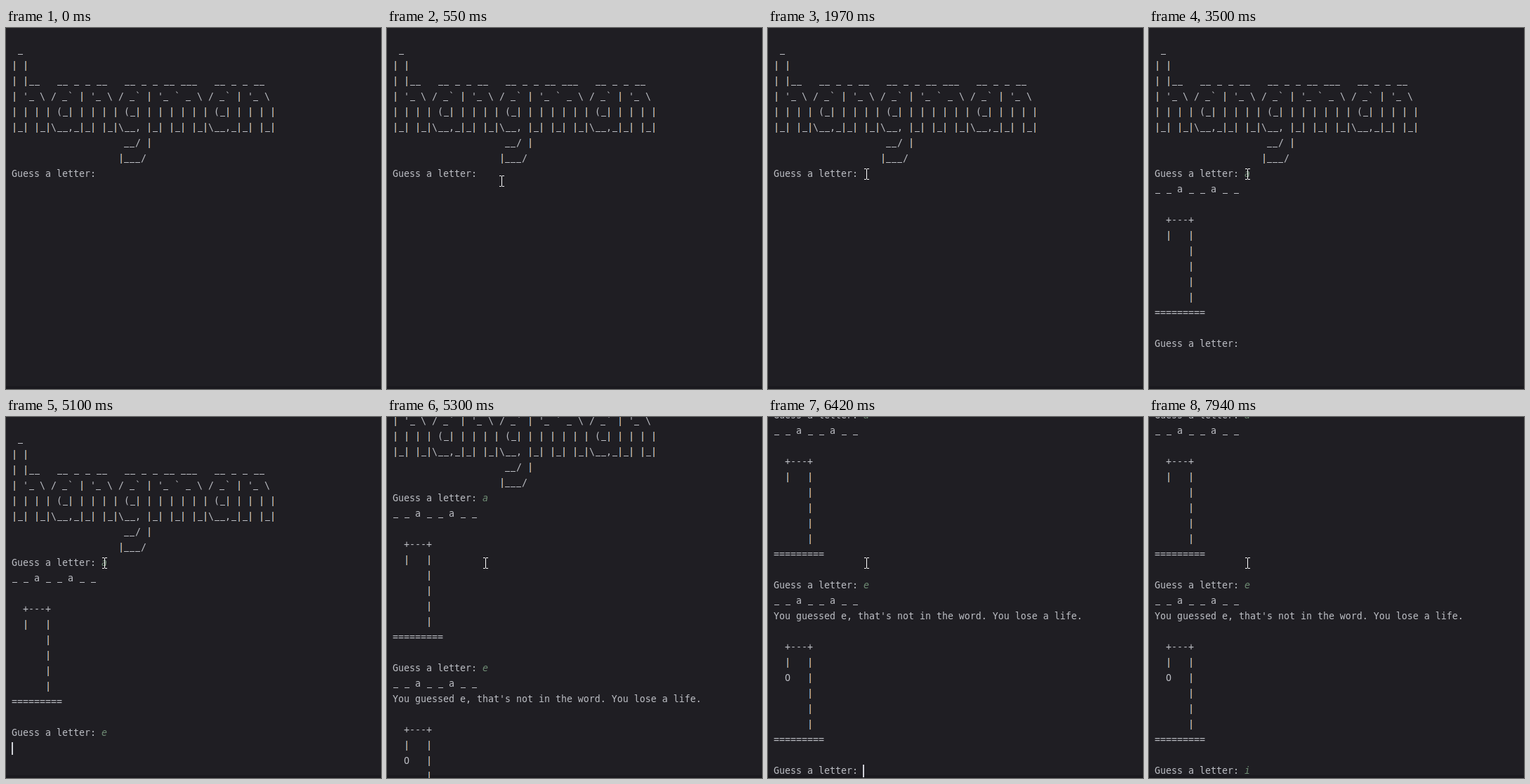
Recreate the animation shown at these times as an HTML page. Size 534 by 514 pixels, loop 8 s.

```html
<!DOCTYPE html>
<html lang="en">
<head>
<meta charset="utf-8">
<title>Hangman console</title>
<style>
html, body { margin: 0; width: 100%; height: 100%; overflow: hidden; background: #1f1e23; }
.stage { position: relative; width: 534px; height: 514px; overflow: hidden; }
.edge { position: absolute; left: 0; top: 510px; width: 100%; height: 4px; background: #1a191e; }
.pane { position: absolute; inset: 0; }
pre {
  position: absolute; left: 8px; top: 21px; margin: 0;
  font: 13.29px/22px "DejaVu Sans Mono", "Noto Sans Mono", monospace;
  font-variant-ligatures: none;
  color: #bcbec4;
}
/* Bars carry the blue and orange fringes of subpixel text. */
pre b, pre u { font-weight: 400; text-decoration: none; color: transparent; background-repeat: no-repeat; }
pre b {
  background-image: linear-gradient(90deg, #5b8db8 50%, #c9935a 50%);
  background-size: 2px 14px; background-position: center bottom;
}
pre u {
  background-image: linear-gradient(#bcbec4, #bcbec4);
  background-size: 7px 1px; background-position: center 13px;
}
pre em { color: #6f8c74; }
.caret { position: absolute; left: 0; top: 0; width: 2px; height: 18px; background: #ced0d6; }
.click {
  position: absolute; left: 124px; top: 195px; width: 24px; height: 24px;
  border-radius: 50%; background: rgba(255, 255, 0, .5);
}
.mouse { position: absolute; left: 0; top: 0; width: 7px; height: 16px; }
.mouse path { stroke: #fff; fill: none; }

.pane, .caret, .click, .mouse, .a, .round1, .e, .round2, .i { animation: 8s step-end infinite; }
.pane { animation-name: scroll; }
.caret { animation-name: caret; }
.click { animation-name: click; }
.mouse { animation-name: mouse; }
.a { animation-name: a; }
.round1 { animation-name: round1; }
.e { animation-name: e; }
.round2 { animation-name: round2; }
.i { animation-name: i; }

@keyframes a { 0% { opacity: 0 } 29.5%, to { opacity: 1 } }
@keyframes round1 { 0% { opacity: 0 } 36.25%, to { opacity: 1 } }
@keyframes e { 0% { opacity: 0 } 54.5%, to { opacity: 1 } }
@keyframes round2 { 0% { opacity: 0 } 66.25%, to { opacity: 1 } }
@keyframes i { 0% { opacity: 0 } 91.75%, to { opacity: 1 } }
@keyframes click { 0% { opacity: 0 } 12% { opacity: 1 } 13.625%, to { opacity: 0 } }
@keyframes scroll {
  0% { transform: none }
  66.25% { transform: translateY(-92px) }
  67%, to { transform: translateY(-210px) }
}
@keyframes caret {
  0% { opacity: 0; transform: translate(135px, 199px) }
  12% { opacity: 1; transform: translate(135px, 199px) }
  24.625% { opacity: 0; transform: translate(135px, 199px) }
  29.5% { opacity: 1; transform: translate(143px, 199px) }
  33.625% { opacity: 1; transform: translate(8px, 221px) }
  36.25% { opacity: 1; transform: translate(135px, 441px) }
  43.75% { opacity: 0; transform: translate(135px, 441px) }
  49.5% { opacity: 1; transform: translate(135px, 441px) }
  54.5% { opacity: 1; transform: translate(143px, 441px) }
  62.125% { opacity: 0; transform: translate(143px, 441px) }
  63.75% { opacity: 1; transform: translate(8px, 463px) }
  66.25% { opacity: 0; transform: translate(135px, 705px) }
  67% { opacity: 1; transform: translate(135px, 705px) }
  74.5% { opacity: 0; transform: translate(135px, 705px) }
  80.25% { opacity: 1; transform: translate(135px, 705px) }
  86.875% { opacity: 0; transform: translate(135px, 705px) }
  91.75% { opacity: 1; transform: translate(143px, 705px) }
  99.25%, to { opacity: 0; transform: translate(143px, 705px) }
}
@keyframes mouse {
  0% { opacity: 0; transform: translate(383px, 475px) }
  1.625% { opacity: 1; transform: translate(383px, 475px) }
  2.575% { transform: translate(369px, 453px) }
  3.525% { transform: translate(330px, 400px) }
  4.475% { transform: translate(275px, 335px) }
  5.425% { transform: translate(215px, 268px) }
  6.375% { transform: translate(160px, 210px) }
  7.325% { transform: translate(125px, 180px) }
  8.275% { transform: translate(108px, 168px) }
  9.225% { transform: translate(114px, 176px) }
  10.175% { transform: translate(127px, 191px) }
  11.125% { transform: translate(135px, 200px) }
  15.5%, to { opacity: 1; transform: translate(137px, 200px) }
}
</style>
</head>
<body>
<div class="stage">
  <div class="edge"></div>
  <div class="pane">
<pre>
 _
| |
| |__   __ _ _ __   __ _ _ __ ___   __ _ _ __
| '_ \ / _` | '_ \ / _` | '_ ` _ \ / _` | '_ \
| | | | (_| | | | | (_| | | | | | | (_| | | | |
|_| |_|\__,_|_| |_|\__, |_| |_| |_|\__,_|_| |_|
                    __/ |
                   |___/
Guess a letter: <em class="a">a</em>
<span class="round1">_ _ a _ _ a _ _

  +---+
  |   |
      |
      |
      |
      |
=========

Guess a letter: </span><em class="e">e</em>
<span class="round2">_ _ a _ _ a _ _
You guessed e, that's not in the word. You lose a life.

  +---+
  |   |
  O   |
      |
      |
      |
=========

Guess a letter: </span><em class="i">i</em>
</pre>
    <div class="caret"></div>
  </div>
  <div class="click"></div>
  <svg class="mouse" viewBox="0 0 7 16"><path d="M0 .5h3m1 0h3M3.5 1v14M0 15.5h3m1 0h3"/></svg>
</div>
<script>
// Wrap bars and underscores so that CSS can draw them as crisp strokes.
const pre = document.querySelector('pre');
pre.innerHTML = pre.innerHTML.replace(/\|/g, '<b>|</b>').replace(/_/g, '<u>_</u>');
</script>
</body>
</html>
```
